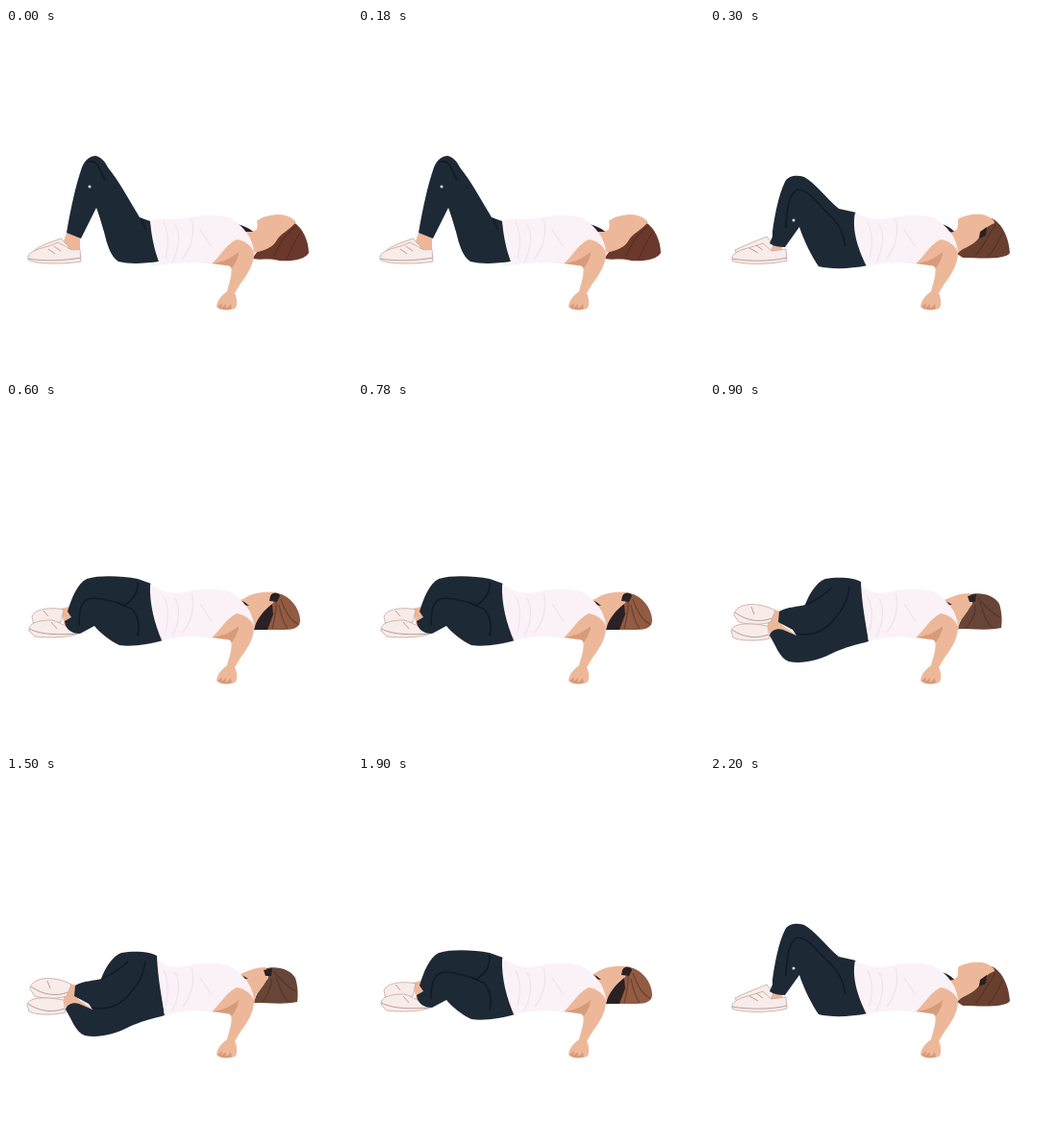
Recreate the animation shown at these times as an HTML page. Size 360 by 360 pixels, loop 2.5 s.

```html
<!DOCTYPE html>
<html lang="en">
<head>
<meta charset="utf-8">
<title>Lying knee roll</title>
<style>
  html, body { margin: 0; width: 100%; height: 100%; overflow: hidden; background: #fff; }
  svg { display: block; width: 100vw; height: 100vh; }
  .skin { fill: #edb899; }
  .shade { fill: #d79b7b; }
  .shirt { fill: #faf2f7; }
  .fold { fill: none; stroke: #efe4eb; stroke-width: 1.3; }
  .pants { fill: #1e2936; }
  .crease { fill: none; stroke: #111a25; stroke-width: 1.6; }
  .shoe { fill: #f8ecea; stroke: #c3a59f; stroke-width: .8; }
  .sole { fill: none; stroke: #b5938d; stroke-width: .9; }
  .dark { fill: #2b2022; }
  .strand { fill: none; stroke: #3d2420; stroke-width: 1.3; opacity: .45; }
  .dot { fill: #d5dce2; }
</style>
</head>
<body>
<svg viewBox="0 0 360 360">
  <g id="pose"></g>
  <g id="arm">
    <path class="skin" d="M214 245C221 240 229 225 240 220C249 221 258 228 258 236C257 248 250 258 244 266L238 276C241 282 241 290 238 292C233 294 223 294 219 290C220 282 225 278 230 274C232 265 236 257 234 248Z"/>
    <path class="shade" d="M215 245C226 243 234 240 242 233C242 239 239 244 235 250L232 247ZM220 290L225 286L224 291L229 287L229 292L234 287L235 292C230 294 223 294 220 290Z"/>
  </g>
</svg>
<script>
const poses = [
  {
    ankle: 'M63 213L77 218L77 232L67 231L60 222Z',
    shoes: ['M28 233C34 226 47 223 57 219L64 226L70 236L30 242Z',
            'M23 237C28 229 43 229 54 223L62 227C67 232 72 231 77 230L78 243C60 246 30 246 23 241Z'],
    soles: 'M23 240C40 243 61 242 78 239M44 230L51 235M50 227L57 232',
    pants: 'M63 213C67 190 72 165 79 145C82 137 88 133 93 133C99 134 103 139 106 145C118 160 130 182 139 197L150 201L159 243C145 245 128 246 117 243C109 238 105 225 102 212C99 202 97 195 94 187L78 219Z',
    creases: 'M84 140C94 134 99 149 103 159M140 198L146 210',
    dot: [87, 165],
    waist: 'M150 200C151 215 154 230 159 243L148 248',
    hair: 'M299 202C309 208 315 222 315 234C311 241 298 243 284 242C272 239 266 242 257 240C258 234 269 226 277 219C278 212 289 206 299 202Z',
    hairColor: '#6b382c',
    head: 'M241 207L257 211C262 211 262 207 261 201C266 196 275 195 282 194C291 194 298 197 302 202C294 211 285 214 281 222C276 230 266 232 257 234L246 216Z',
    nape: 'M241 204C247 206 253 208 257 212L248 212Z',
    strands: 'M301 207C290 214 285 225 279 237M306 213C300 223 297 230 292 240'
  },
  {
    ankle: 'M62 222L75 227L76 235L64 232Z',
    shoes: ['M26 231C36 226 47 222 59 217L66 226L62 236L30 239Z',
            'M23 238C27 230 43 229 55 224L64 232L79 230L80 242C61 247 31 246 23 242Z'],
    soles: 'M23 240C40 243 64 243 80 239M41 229L50 234M48 226L55 231',
    pants: 'M65 212C67 197 71 174 78 160C82 153 91 153 98 155C108 160 121 177 134 188L152 192L164 247C145 251 125 251 113 248C106 238 98 222 93 207L78 228C72 228 66 227 62 224L65 217Z',
    creases: 'M79 208C80 184 83 172 91 168C105 169 113 185 126 196C135 206 139 214 141 227',
    dot: [87, 200],
    waist: 'M151 192C147 211 155 232 163 248',
    hair: 'M293 198C304 203 311 218 312 234C308 240 292 240 263 239L257 235L270 222L284 207Z',
    hairColor: '#69402f',
    head: 'M240 206L252 211C259 212 258 205 258 199C264 195 274 193 283 194C292 196 296 200 296 203C287 207 281 212 280 218C275 226 265 228 257 234L246 216Z',
    nape: 'M240 204C246 205 251 208 254 212L247 213ZM281 212L288 207L287 216L280 219Z',
    strands: 'M297 205C291 214 285 226 276 237M304 213C299 224 296 231 289 238'
  },
  {
    ankle: 'M57 215L70 212L74 237L61 234Z',
    shoes: ['M27 223C30 215 47 213 60 216L57 229L29 233Z',
            'M24 238C23 229 36 227 48 227C58 229 67 238 76 239C75 245 43 246 30 244Z'],
    soles: 'M24 236C38 243 57 242 75 241M39 217L44 223M47 229L53 236',
    pants: 'M64 218C68 205 74 189 84 184C98 180 120 181 137 184L151 189L163 248C150 252 130 255 118 253C107 248 98 240 92 233L77 241C70 241 62 238 61 228L68 224Z',
    creases: 'M76 232C76 214 79 205 90 204C109 205 121 211 132 216C139 225 139 235 137 244M113 208L124 211C133 205 138 198 137 187',
    waist: 'M150 189C149 211 155 231 162 248',
    hair: 'M283 199C296 202 305 214 306 226C307 234 300 237 290 237L262 237C263 225 269 216 277 210Z',
    hairColor: '#925b42',
    head: 'M240 207L247 205C255 199 266 197 280 198L282 204C276 209 272 216 267 224L257 235L246 217Z',
    nape: 'M239 205L248 208L253 212L245 211ZM275 202C278 197 284 198 285 202L282 208L274 207ZM258 237C260 226 269 216 277 210L278 221L272 237Z',
    strands: 'M281 206C282 217 279 227 277 236M286 205C290 216 294 226 305 232M284 211C286 222 289 230 293 236'
  },
  {
    ankle: 'M59 214L74 218L75 232L89 242L62 241L60 232Z',
    shoes: ['M25 222C25 213 38 209 50 211C57 212 63 214 68 217L63 229C55 232 40 232 30 229Z',
            'M22 238C24 229 43 230 60 233L62 246C50 249 31 249 24 245Z'],
    soles: 'M26 219C40 229 54 229 64 225M23 237C36 246 50 246 61 242M43 213L46 221',
    pants: 'M72 218C81 213 92 213 99 211C103 200 110 188 120 184C132 182 148 182 157 187L165 249C155 252 140 255 126 262C112 269 95 273 82 270C72 266 69 254 62 243C63 238 70 235 76 237L90 243L86 237L71 229Z',
    creases: 'M89 241C107 245 121 237 130 225C140 214 144 204 145 192M100 211C108 207 118 202 127 193',
    waist: 'M157 187C158 211 162 230 165 249',
    hair: 'M267 201C280 197 295 200 301 210C304 219 304 230 303 235C290 238 274 236 258 236C260 226 267 218 273 210Z',
    hairColor: '#674638',
    head: 'M241 207C250 204 257 199 270 199L274 206C271 214 266 221 260 228L258 237L246 217Z',
    nape: 'M239 205L247 208L252 211L244 211ZM268 202L277 200L276 208L270 208Z',
    strands: 'M278 203C286 211 293 221 302 224M276 211C277 222 270 230 267 235M281 209C285 220 287 229 294 235'
  }
];

const path = (kind, d, extra = '') => `<path class="${kind}" d="${d}" ${extra}/>`;

function draw(p) {
  // The waist edge moves while the rest of the top stays still.
  const shirt = p.waist + 'C182 244 199 243 214 246L240 222L258 233C257 219 248 206 232 197C215 193 199 195 185 198C172 200 162 198 ' +
    p.waist.slice(1).split('C')[0] + 'Z';
  return path('skin', p.ankle) +
    p.shoes.map(d => path('shoe', d)).join('') + path('sole', p.soles) +
    path('pants', p.pants) + path('crease', p.creases) +
    (p.dot ? `<circle class="dot" cx="${p.dot[0]}" cy="${p.dot[1]}" r="1.5"/>` : '') +
    path('hair', p.hair, `fill="${p.hairColor}"`) +
    path('skin', p.head) + path('dark', p.nape) + path('strand', p.strands) +
    path('shirt', shirt) +
    path('fold', 'M176 204C183 218 179 232 173 244M193 199C198 214 191 231 184 240M164 202C171 217 168 230 166 239M202 210L214 228');
}

const drawings = poses.map(draw);
const schedule = [[300, 0], [600, 1], [900, 2], [1900, 3], [2200, 2], [2500, 1]];
const figure = document.getElementById('pose');
let shown = -1;

function tick() {
  const time = performance.now() % 2500;
  const pose = schedule.find(([end]) => time < end)[1];
  if (pose !== shown) {
    figure.innerHTML = drawings[pose];
    shown = pose;
  }
  requestAnimationFrame(tick);
}
tick();
</script>
</body>
</html>
```
